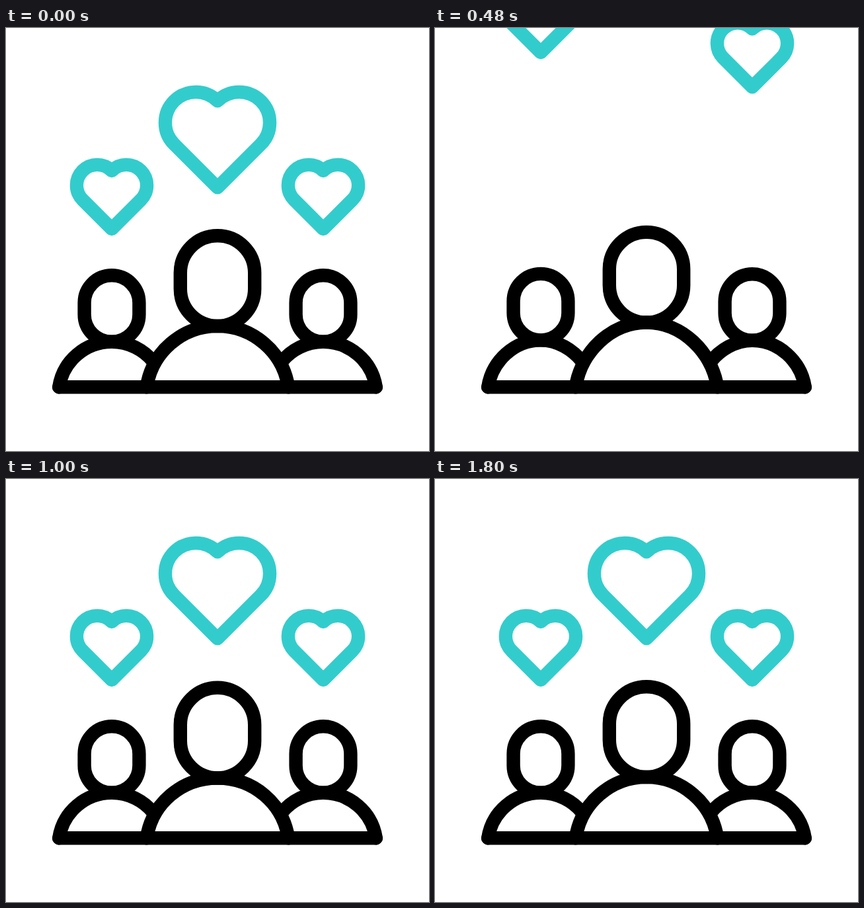
Recreate the animation shown at these times as an HTML page. Size 640 by 640 pixels, loop 2000 ms.

```html
<!DOCTYPE html>
<html lang="en">
<head>
<meta charset="utf-8">
<title>People and hearts</title>
<style>
  html, body { margin: 0; width: 100%; height: 100%; overflow: hidden; background: #fff; }
  svg { display: block; width: 100vw; height: 100vh; }
  path { fill: none; stroke-width: 20.4; stroke-linecap: round; stroke-linejoin: round; }
  .heart { stroke: #33cccc; }
  .ink { stroke: #000; }
</style>
</head>
<body>
<svg id="stage" viewBox="0 0 640 640"></svg>
<script>
const LOOP = 2000, STEP = 40, BASE = 543.3;
const stage = document.getElementById('stage');

function addPath(cls, d = '') {
  const el = document.createElementNS('http://www.w3.org/2000/svg', 'path');
  el.setAttribute('class', cls);
  el.setAttribute('d', d);
  stage.appendChild(el);
  return el;
}

const ramp = (t, start, length) => Math.max(0, Math.min(1, (t - start) / length));
const easeOut = u => 1 - (1 - u) ** 1.46;
// One full sine swing, at rest before and after
const swing = (t, start, length) => Math.sin(2 * Math.PI * ramp(t, start, length));

// Heart centred on the origin; d is the horizontal offset of each lobe
function heartPath(d) {
  const r = d * Math.SQRT2, c = d * (Math.SQRT2 - 3) / 2;
  return `M0 ${c - d}A${r} ${r} 0 0 0 ${-2 * d} ${c + d}` +
    `L0 ${c + 3 * d}L${2 * d} ${c + d}A${r} ${r} 0 0 0 0 ${c - d}Z`;
}

const big = { y: 169.1, d: 32.75, rise: 275 };
const small = { y: 255.4, d: 22, rise: 207 };
const hearts = [
  { ...big, x: 320, leave: 40, speed: 0.615 },
  { ...small, x: 160, leave: 141, speed: 0.7875 },
  { ...small, x: 480, leave: 162, speed: 0.675 }
];

const side = { r: 41.4, top: 374.3, bottom: 474.8, half: 79.8, reach: 64 };
const people = [
  { ...side, x: 160, dir: 1, start: 400, length: 360, amp: 2.5 },
  { ...side, x: 480, dir: -1, start: 440, length: 520, amp: 4.4 },
  { x: 320, dir: 1, r: 56.2, top: 314.3, bottom: 451, half: 107.2, reach: 107.2,
    start: 400, length: 620, amp: 7.5 }
];

hearts.forEach((h, i) => {
  h.back = 560 + i * STEP;
  h.el = addPath('heart', heartPath(h.d));
});
people.forEach(p => {
  p.head = addPath('ink');
  p.body = addPath('ink');
});
addPath('ink', `M80.2 ${BASE}H559.8`);

function drawHeart(h, t) {
  let dy = 0, scale = 1 - 0.0466 * swing(t, 1300, 500), alpha = 1;
  if (t < h.back) {
    dy = -Math.max(0, t - h.leave) * h.speed;
  } else {
    const grown = easeOut(ramp(t, h.back, 190));
    dy = h.rise * (1 - grown);
    scale *= grown;
    alpha = ramp(t, Math.max(600, h.back), 247);
  }
  h.el.setAttribute('transform', `translate(${h.x} ${h.y + dy}) scale(${scale})`);
  h.el.setAttribute('opacity', alpha);
}

// Cubic from the apex of a circular body to dx on one side;
// the apex and its handle move by dy, the far end stays put
function shoulder(p, dx, dy) {
  const h = BASE - p.bottom, R = (p.half ** 2 + h ** 2) / (2 * h);
  const a = Math.asin(dx / R), k = 4 / 3 * Math.tan(a / 4) * R;
  const y = p.bottom + R - R * Math.cos(a);
  return {
    near: Math.sign(dx) * Math.abs(k),
    handle: [dx - k * Math.cos(a), y - k * Math.sin(a)],
    end: [dx, y],
    top: p.bottom + dy
  };
}

function drawPerson(p, t) {
  const dy = -p.amp * (swing(t, p.start, p.length) + 0.6 * swing(t, 1480, 320));
  const { x, r, dir } = p, top = p.top + dy, bottom = p.bottom + dy;
  p.head.setAttribute('d',
    `M${x - r} ${top + r}A${r} ${r} 0 0 1 ${x + r} ${top + r}V${bottom - r}` +
    `A${r} ${r} 0 0 1 ${x - r} ${bottom - r}Z`);

  const half = dx => {
    const s = shoulder(p, dx, dy);
    return `M${x} ${s.top}C${x + s.near} ${s.top} ` +
      `${x + s.handle[0]} ${s.handle[1]} ${x + s.end[0]} ${s.end[1]}`;
  };
  p.body.setAttribute('d', half(-dir * p.half) + half(dir * p.reach));
}

function render(t) {
  hearts.forEach(h => drawHeart(h, t));
  people.forEach(p => drawPerson(p, t));
}

const begin = performance.now();
function tick() {
  const t = (performance.now() - begin) % LOOP;
  render(Math.floor(t / STEP) * STEP);
  requestAnimationFrame(tick);
}
render(0);
requestAnimationFrame(tick);
</script>
</body>
</html>
```
